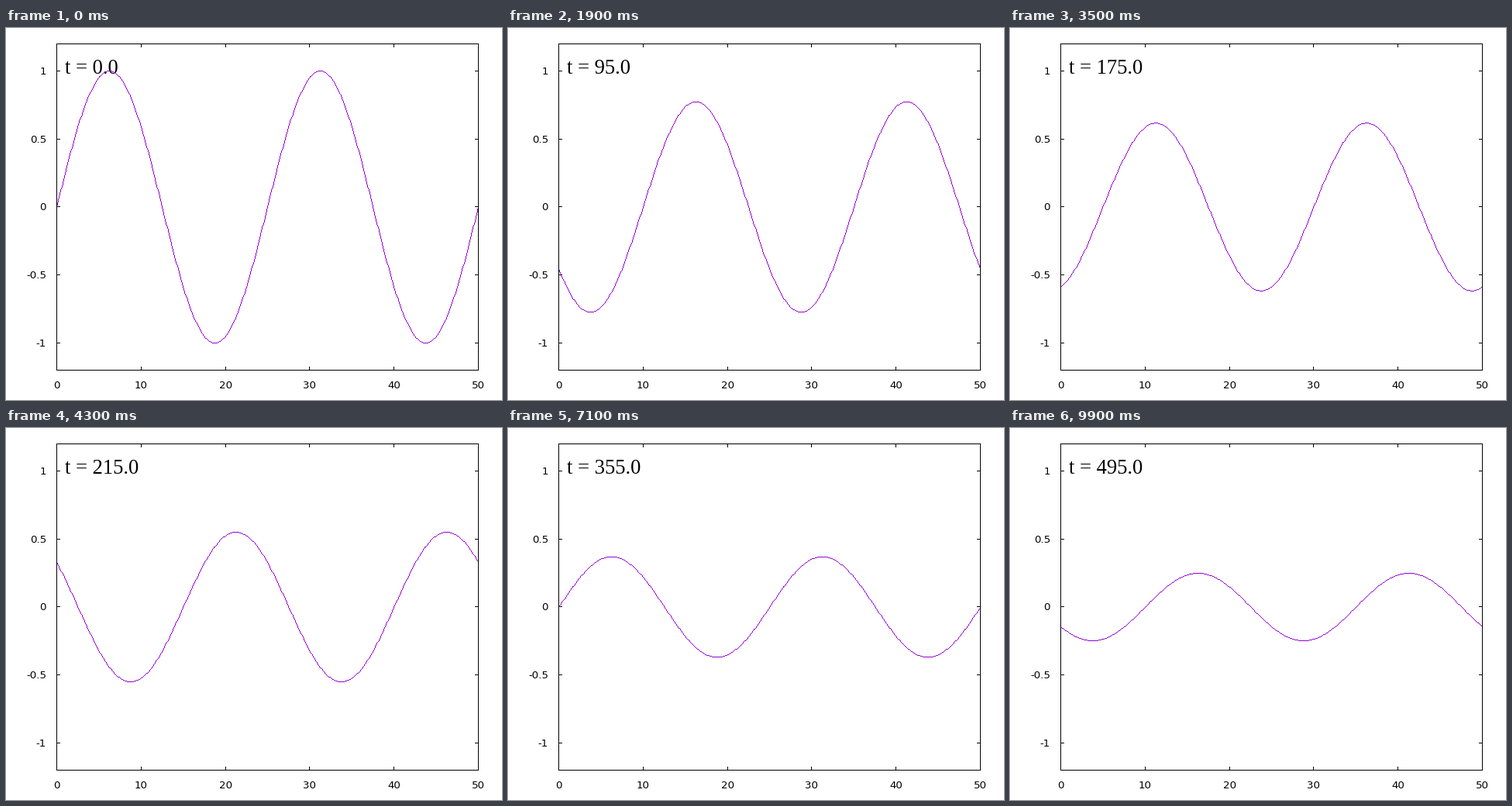
Animation, 640 px wide and 480 px high, one loop 10 s. Source, as a matplotlib script:

```python
import numpy as np
import matplotlib.pyplot as plt
from matplotlib.animation import FuncAnimation
from matplotlib.patches import Rectangle

W, H, DPI = 640, 480, 100
LEFT, RIGHT, TOP, BOTTOM = 65, 609, 20, 441
FRAMES, INTERVAL = 100, 100
T_STEP = 5.0

# Upwind advection of a sine wave: u_t = u_x on a grid of step DX
DX, DT, LENGTH = 0.1, 0.01, 50.0
K = 4 * np.pi / LENGTH
GAIN = 1 - DT / DX + DT / DX * np.exp(1j * K * DX)
STEPS = round(T_STEP / DT)
x = np.linspace(0, LENGTH, round(LENGTH / DX) + 1)

fig = plt.figure(figsize=(W / DPI, H / DPI), dpi=DPI, facecolor="white")
ax = fig.add_axes([0, 0, 1, 1])
ax.axis("off")


def col(v):
    return LEFT + np.floor(v * (RIGHT - LEFT) / LENGTH + 0.5).astype(int)


def row(v):
    return BOTTOM - np.floor((v + 1.2) * (BOTTOM - TOP) / 2.4 + 0.5).astype(int)


def bar(x0, y0, x1, y1, z):
    """Fill the pixels from (x0, y0) to (x1, y1), both included."""
    ax.add_patch(Rectangle((x0, y0), x1 - x0 + 1, y1 - y0 + 1, fc="black",
                           lw=0, antialiased=False, zorder=z))


def text(px, py, s, size, font, ha):
    return ax.text(px, py, s, fontsize=size * 72 / DPI, family=font,
                   ha=ha, va="baseline", color="black", zorder=2)


def trace(cols, rows):
    """Pixels of the one-pixel polyline through whole-pixel points."""
    mask = np.zeros((H, W), bool)
    for x0, y0, x1, y1 in zip(cols, rows, cols[1:], rows[1:]):
        n = max(abs(x1 - x0), abs(y1 - y0), 1)
        s = np.arange(n + 1) / n
        mask[np.floor(y0 + s * (y1 - y0) + 0.5).astype(int),
             np.floor(x0 + s * (x1 - x0) + 0.5).astype(int)] = True
    return mask


pixels = np.zeros((H, W, 4))
pixels[..., :3] = np.array([0x94, 0x00, 0xD3]) / 255
curve = ax.imshow(pixels, extent=(0, W, H, 0), interpolation="nearest",
                  aspect="auto", zorder=3)
ax.set_xlim(0, W)
ax.set_ylim(H, 0)

TICK = 4
for v in range(0, 51, 10):
    c = int(col(v))
    bar(c, TOP, c, TOP + TICK, 1)
    bar(c, BOTTOM - TICK, c, BOTTOM, 1)
    text(c + 0.5, 465, f"{v}", 13.33, "DejaVu Sans", "center")
for v in (-1, -0.5, 0, 0.5, 1):
    r = int(row(v))
    bar(LEFT, r, LEFT + TICK, r, 1)
    bar(RIGHT - TICK, r, RIGHT, r, 1)
    text(52, r + 5, f"{v:g}", 13.33, "DejaVu Sans", "right")

for edge in (LEFT, RIGHT):
    bar(edge, TOP, edge, BOTTOM, 4)
for edge in (TOP, BOTTOM):
    bar(LEFT, edge, RIGHT, edge, 4)

label = text(76, 59, "", 26.67, "Liberation Serif", "left")


def update(i):
    # The wave starts moving one output step after the clock
    wave = np.exp(1j * K * x) * GAIN ** (STEPS * max(i - 1, 0))
    pixels[..., 3] = trace(col(x), row(wave.imag))
    curve.set_data(pixels)
    label.set_text(f"t = {i * T_STEP:.1f}")
    return curve, label


anim = FuncAnimation(fig, update, frames=FRAMES, interval=INTERVAL,
                     repeat=True, repeat_delay=0)
plt.show()
```
